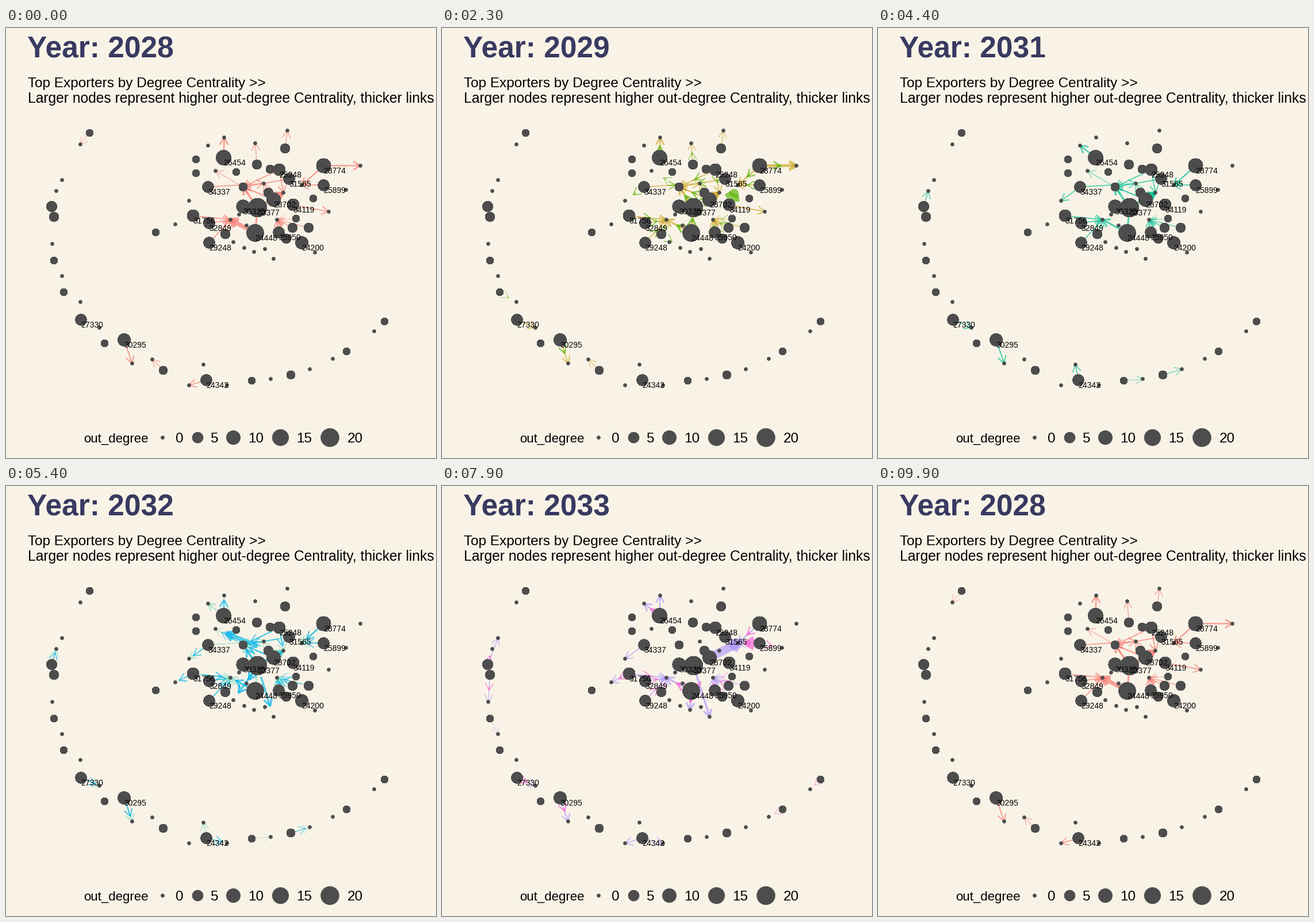
A matplotlib script that plays this animation: 748 px wide and 748 px high, repeating every 10 s.

```python
import numpy as np
import matplotlib.pyplot as plt
from matplotlib.animation import FuncAnimation
from matplotlib.collections import LineCollection

SIZE, DPI = 748, 88
PT = 72 / DPI
plt.rcParams["font.family"] = "Liberation Sans"
BG, INK, TITLE = "#F9F3E7", "#4D4D4D", "#383A60"

# exporters: x, y, out-degree
HUBS = [
    (145, 182, 1), (79, 310, 4), (83, 328, 3), (83, 404, 1), (100, 459, 1),
    (130, 507, 5), (171, 548, 1), (205, 542, 7), (273, 595, 2), (348, 612, 5),
    (427, 613, 1), (495, 603, 2), (592, 562, 1), (658, 510, 1), (330, 228, 1),
    (330, 252, 1), (378, 225, 11), (400, 250, 1), (436, 237, 3), (459, 245, 2),
    (475, 246, 6), (485, 209, 3), (492, 262, 5), (552, 239, 10), (552, 273, 5),
    (534, 296, 1), (499, 307, 6), (412, 276, 2), (351, 276, 5), (456, 286, 3),
    (465, 298, 9), (437, 312, 20), (412, 310, 8), (325, 326, 6), (353, 339, 5),
    (381, 358, 3), (353, 373, 5), (433, 356, 16), (474, 355, 5), (487, 366, 3),
    (498, 347, 3), (526, 347, 3), (504, 331, 1), (514, 373, 7), (260, 355, 1),
]
NAMES = [27330, 30295, 24342, 26454, 25248, 31565, 28774, 25899, 34119, 34337,
         28702, 33377, 30325, 31756, 32849, 29248, 24448, 25950, 24200]
# importers: x, y, main exporter
DOTS = [
    (128, 202, 0), (97, 264, 1), (87, 283, 1), (80, 375, 2), (97, 431, 3),
    (128, 476, 4), (162, 521, 5), (219, 583, 7), (254, 576, 8), (318, 621, 9),
    (343, 585, 9), (384, 621, 9), (460, 610, 10), (528, 593, 11),
    (568, 575, 12), (640, 527, 13), (379, 190, 16), (351, 204, 16),
    (433, 200, 18), (489, 178, 21), (616, 239, 23), (364, 248, 27),
    (448, 270, 28), (482, 286, 30), (514, 273, 23), (591, 281, 24),
    (561, 319, 26), (318, 300, 28), (294, 341, 33), (390, 333, 37),
    (405, 324, 32), (418, 343, 31), (471, 333, 40), (395, 372, 31),
    (414, 382, 35), (431, 389, 37), (450, 384, 31), (465, 401, 31),
    (537, 390, 43),
]
# two exporters also import
CORE, MAIN = len(DOTS), len(DOTS) + 1
ENDS = DOTS + [(*HUBS[27][:2], 30), (*HUBS[31][:2], 37)]
# further exporters of the busy markets
MARKETS = {22: [29], 23: [20, 31], 24: [24], 29: [33, 34, 35, 36],
           32: [38, 39, 41, 42], CORE: [20, 22, 31]}
STEADY = [7, 24, 29, 32]
# per year: color, other active importers, largest flow (exporter, importer, width)
YEARS = [
    ("#F8766D", [0, 8, 9, 16, 18, 19, 20, 21, 22, 23, 26, CORE, MAIN], (37, 29, 7)),
    ("#C49A00", [6, 8, 16, 18, 19, 20, 22, 23, 26, CORE, MAIN], (23, 20, 5)),
    ("#53B400", [5, 16, 18, 20, 21, 22, 23, 27, 34, CORE, MAIN], (26, 24, 16)),
    ("#00C094", [2, 6, 10, 12, 13, 17, 21, 22, 23, 27, 30, CORE, MAIN], (30, 23, 4)),
    ("#00B6EB", [2, 6, 11, 13, 16, 21, 23, 27, 28, 30, 31, 33, 37, CORE], (29, 21, 8)),
    ("#A58AFF", [1, 3, 4, 6, 9, 11, 16, 17, 27, 28, 35, 37], (30, 24, 15)),
    ("#FB61D7", [2, 3, 6, 14, 15, 17, 25, 28, 35, 36], (24, 24, 11)),
]

ALPHA, HEAD, SPREAD = 0.66, 14.5, np.radians(30)
STEPS = 7
STARTS = [8, 23, 38, 51, 65, 79, 93]


def links(active, flow):
    """Start points, end points and widths of one year's links."""
    widths = {(s, d): 0.8 * np.sqrt(HUBS[s][2])
              for d in STEADY + active for s in [ENDS[d][2], *MARKETS.get(d, [])]}
    widths[flow[:2]] = flow[2]
    a = np.array([HUBS[s][:2] for s, _ in widths], float)
    b = np.array([ENDS[d][:2] for _, d in widths], float)
    return a, b, np.array(list(widths.values()))


def arrows(a, b, grow):
    """Shafts and open heads, scaled about each link's midpoint."""
    mid, half = (a + b) / 2, (b - a) / 2 * grow
    start, tip = mid - half, mid + half
    back = np.arctan2(*(a - b).T[::-1])
    arms = [tip + HEAD * np.c_[np.cos(back + s), np.sin(back + s)]
            for s in (-SPREAD, SPREAD)]
    return np.stack([start, tip], 1), np.stack([arms[0], tip, arms[1]], 1)


def discs(x, y, degree):
    radius = 3.4 + 12.9 * np.sqrt(np.asarray(degree) / 20)
    ax.scatter(x, y, s=(2 * radius * PT) ** 2, c=INK, linewidths=0,
               antialiased=False, zorder=3)


def write(x, y, text, px, **kw):
    return ax.text(x, y, text, fontsize=px * PT, va="baseline", zorder=4, **kw)


def link_layer(z):
    layer = [LineCollection([], capstyle="butt", joinstyle="round", zorder=z + dz)
             for dz in (0, 0.1)]
    for part in layer:
        ax.add_collection(part, autolim=False)
    return layer


def show(layer, state, grow, alpha):
    a, b, widths = flows[state]
    for part, paths in zip(layer, arrows(a, b, grow)):
        part.set_segments(paths)
        part.set_linewidths(widths * PT)
        part.set_color(YEARS[state][0])
        part.set_alpha(alpha)


flows = [links(active, flow) for _, active, flow in YEARS]

fig = plt.figure(figsize=(SIZE / DPI, SIZE / DPI), dpi=DPI, facecolor=BG)
ax = fig.add_axes([0, 0, 1, 1])
ax.set(xlim=(-0.5, SIZE - 0.5), ylim=(SIZE - 0.5, -0.5))  # pixel centres
ax.axis("off")

title = write(37, 50.5, "", 51.5, color=TITLE, weight="bold")
write(38, 103, "Top Exporters by Degree Centrality >>", 24.4)
write(38, 129.5, "Larger nodes represent higher out-degree Centrality, thicker links", 24.6)

x, y, _ = zip(*DOTS)
discs(x, y, 0)
discs(*zip(*HUBS))
leaders = [hub for hub in HUBS if hub[2] >= 5]
for (x, y, _), name in zip(leaders, NAMES):
    write(x, y + 13.5, name, 13.9)

write(135, 721, "out_degree", 22.2)
for degree, x, tx in zip(range(0, 21, 5), (271.5, 333, 394.5, 477, 563),
                         (294.5, 355.5, 421, 505, 593.5)):
    discs([x], [712], degree)
    write(tx, 721, degree, 24.3)

leaving, entering = link_layer(1), link_layer(2)


def update(frame):
    k = sum(s <= frame for s in STARTS)
    step = frame - STARTS[k - 1] + 1 if k else STEPS
    t = min(step / STEPS, 1)
    new, old = k % len(YEARS), (k - 1) % len(YEARS)
    show(leaving, old, 1, ALPHA * (1 - t))
    show(entering, new, t, ALPHA)
    title.set_text(f"Year: {2028 + (new if t > 0.5 else old)}")
    return [title, *leaving, *entering]


anim = FuncAnimation(fig, update, frames=100, interval=100, repeat=True,
                     repeat_delay=0, blit=False)
plt.show()
```
